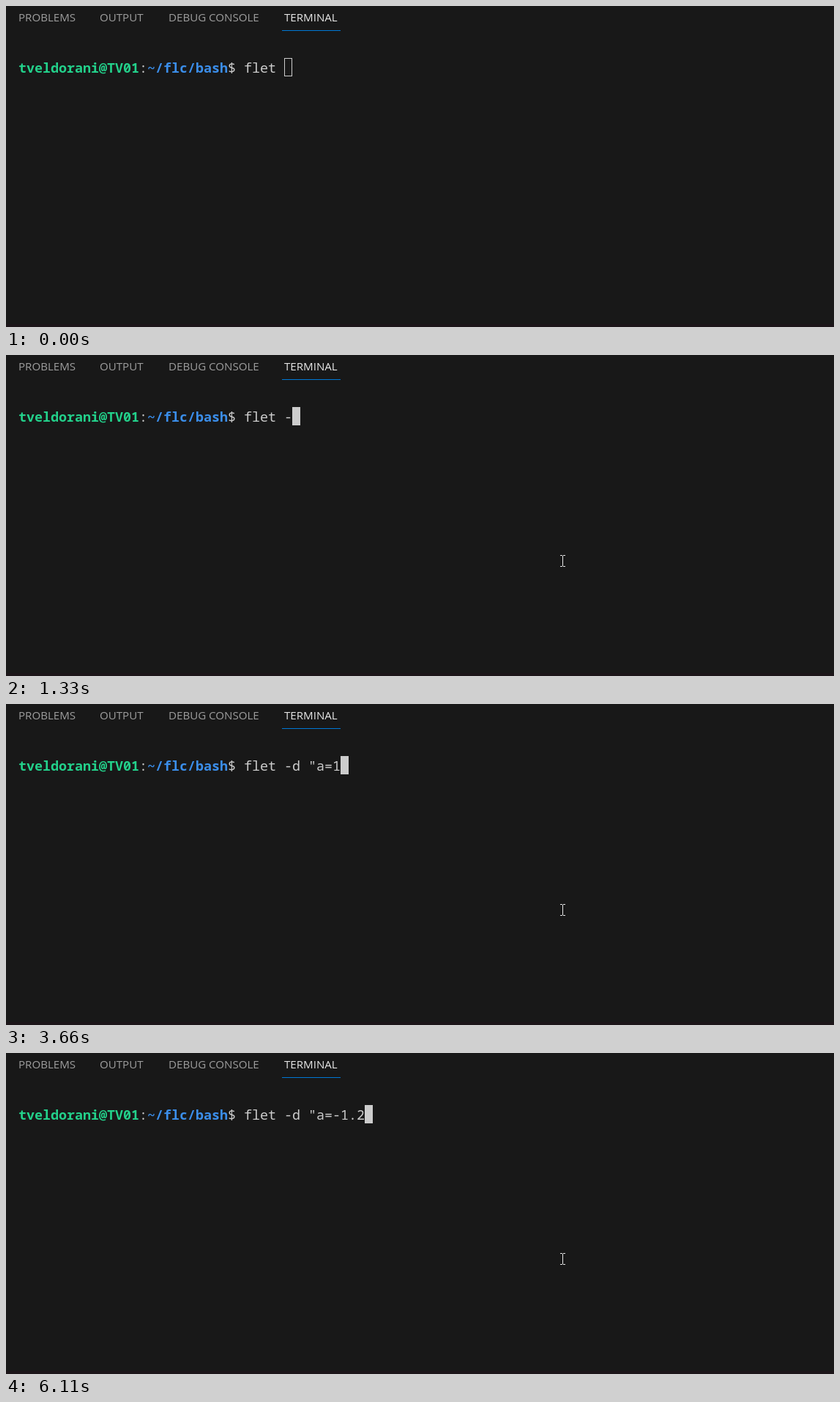
Write an HTML page with a canvas that moves like this. It is 1131x438 px and loops after 8 s.

```html
<!DOCTYPE html>
<html lang="en">
<head>
<meta charset="utf-8">
<title>Terminal</title>
<style>
  html, body { margin: 0; width: 100%; height: 100%; overflow: hidden; background: #181818; }
  canvas { display: block; }
</style>
</head>
<body>
<canvas id="stage" width="1131" height="438"></canvas>
<script>
const ctx = document.getElementById('stage').getContext('2d');
const LOOP = 8000;
const CELL = 11, LEFT = 17, ROW = 71, ROW_H = 25, BASE = 91;
const MONO = '18.33px "Noto Sans Mono", "DejaVu Sans Mono", monospace';
const SANS = '15.1px "Open Sans", "Noto Sans", sans-serif';
const FG = '#cccccc', GREEN = '#23d18b', BLUE = '#3b8eea';

const tabs = [['PROBLEMS', 17], ['OUTPUT', 128], ['DEBUG CONSOLE', 222], ['TERMINAL', 380]];
const prompt = [
  ['tveldorani@TV01', GREEN, 'bold'],
  [':', FG, '500'],
  ['~/flc/bash', BLUE, 'bold'],
  ['$ flet ', FG, '500']
];

// Key presses: [time, key]; '<' is backspace.
const keys = [
  [1330, '-'], [1660, 'd'], [2120, ' '], [2780, '"'], [3060, 'a'], [3390, '='],
  [3660, '1'], [4790, '<'], [5320, '-'], [5650, '1'], [5980, '.'], [6110, '2']
];
const FOCUS = 600;
const glide = { start: 130, step: 67, moves: 5, from: [990, 388], to: [760, 281] };

function rect(x, y, w, h, color) {
  ctx.fillStyle = color;
  ctx.fillRect(x, y, w, h);
}

function text(str, x, y, font, color) {
  ctx.font = font;
  ctx.fillStyle = color;
  ctx.fillText(str, x, y);
}

function typed(t) {
  let s = '';
  for (const [at, key] of keys) {
    if (t < at) break;
    s = key === '<' ? s.slice(0, -1) : s + key;
  }
  return s;
}

function drawTabs() {
  for (const [label, x] of tabs) {
    text(label, x, 21, SANS, label === 'TERMINAL' ? '#e7e7e7' : '#9d9d9d');
  }
  rect(377, 33, 80, 1, '#0078d4');
}

function drawLine(t) {
  let col = 0;
  const put = (str, color, weight) => {
    for (const ch of str) {
      text(ch, LEFT + CELL * col++, BASE, `${weight} ${MONO}`, color);
    }
  };
  for (const part of prompt) put(...part);
  put(typed(t), FG, '500');

  const x = LEFT + CELL * col;
  rect(x, ROW, CELL, ROW_H, FG);
  if (t < FOCUS) rect(x + 1, ROW + 1, CELL - 2, ROW_H - 2, '#181818');
}

function drawPointer(t) {
  const { start, step, moves, from, to } = glide;
  if (t < start) return;
  const p = Math.min(1, Math.floor((t - start) / step) / moves);
  const e = 1 - (1 - p) ** 2;
  const [x, y] = from.map((v, i) => Math.round(v + (to[i] - v) * e));
  const white = '#e8e8e8';
  rect(x, y - 7, 1, 14, white);
  for (const dy of [-8, 7]) {
    rect(x - 3, y + dy, 3, 1, white);
    rect(x + 1, y + dy, 3, 1, white);
  }
}

function draw(now) {
  const t = now % LOOP;
  rect(0, 0, 1131, 438, '#181818');
  rect(0, 434, 1131, 4, '#1c1519');
  drawTabs();
  drawLine(t);
  drawPointer(t);
}

let origin;
function tick(now) {
  origin ??= now;
  draw(now - origin);
  requestAnimationFrame(tick);
}
draw(0);
requestAnimationFrame(tick);
</script>
</body>
</html>
```
